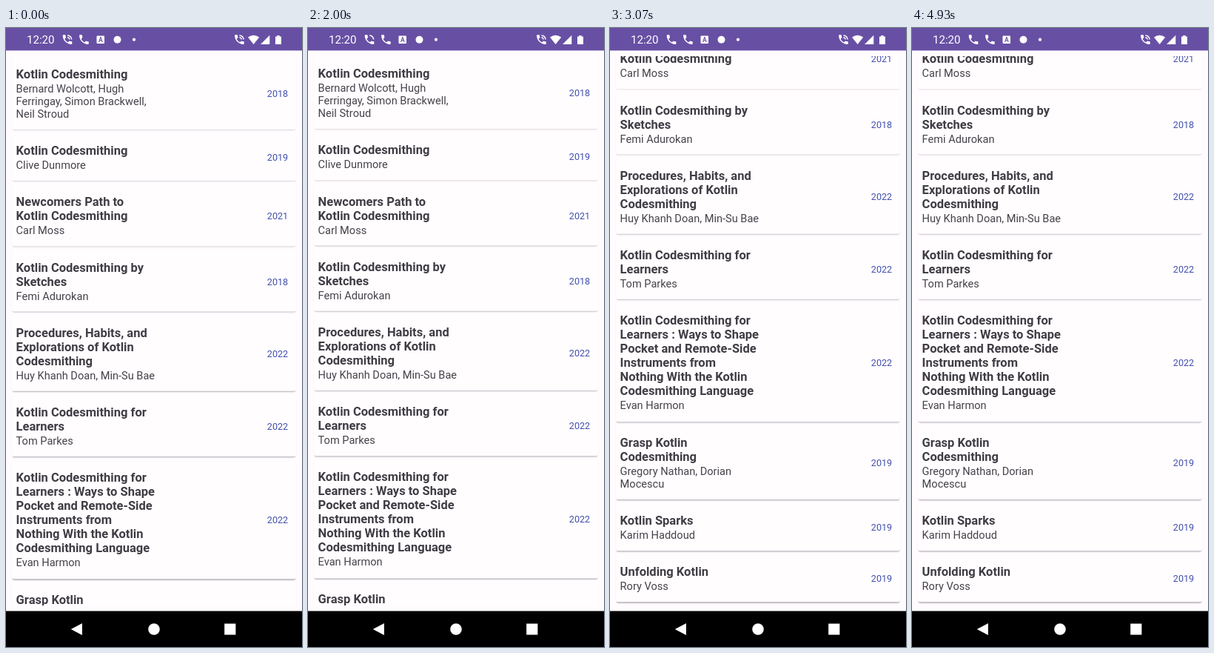
These frames come from a looping animation (400 by 835 pixels, 5000 ms). An HTML page:

```html
<!DOCTYPE html>
<html lang="en">
<head>
<meta charset="utf-8">
<title>Book list</title>
<style>
html, body { margin: 0; width: 100%; height: 100%; overflow: hidden; background: #fffbfe; }
body { position: relative; font-family: Roboto, sans-serif; }
#list { position: absolute; left: 0; top: 38px; width: 400px; height: 741px; }
.card { position: absolute; left: 8px; top: 0; width: 384px; border-radius: 3px; background: #fffdfe; transform-origin: 0 0; white-space: pre; }
.title { position: absolute; left: 5.6px; top: 14.6px; font: bold 16.53px/19.1px Roboto, sans-serif; color: #3f3c44; }
.author { position: absolute; left: 5.6px; font: 14.58px/17.1px Roboto, sans-serif; color: #45424a; }
.year { position: absolute; right: 10.8px; top: calc(50% - 6.6px); font: 12.64px/15px Roboto, sans-serif; color: #4350ad; }
#bars { position: absolute; left: 0; top: 0; }
</style>
</head>
<body>
<div id="list"></div>
<svg id="bars" width="400" height="835" fill="#fff">
  <defs>
    <path id="phone" d="M6.62 10.79c1.44 2.83 3.76 5.14 6.59 6.59l2.2-2.2c.27-.27.67-.36 1.02-.24 1.12.37 2.33.57 3.57.57.55 0 1 .45 1 1V20c0 .55-.45 1-1 1C10.61 21 3 13.39 3 4c0-.55.45-1 1-1h3.5c.55 0 1 .45 1 1 0 1.25.2 2.45.57 3.57.11.35.03.74-.25 1.02z"/>
    <path id="near" d="M15 12h2c0-2.76-2.24-5-5-5v2c1.66 0 3 1.34 3 3z"/>
    <path id="far" d="M19 12h2c0-4.97-4.03-9-9-9v2c3.87 0 7 3.13 7 7z"/>
  </defs>
  <rect width="400" height="30.4" fill="#6750a4"/>
  <text x="28" y="21.2" font-size="15.1">12:20</text>
  <g transform="translate(74.6 7.2) scale(.7)">
    <use href="#phone"/><use href="#near" id="nearWave"/><use href="#far" id="farWave"/>
  </g>
  <use href="#phone" transform="translate(97 7.2) scale(.7)"/>
  <rect x="122.5" y="10.5" width="10.5" height="10.5" rx="1"/>
  <text x="127.75" y="18.8" font-size="8.5" font-weight="bold" text-anchor="middle" fill="#6750a4">A</text>
  <circle cx="150.5" cy="15.7" r="5"/>
  <circle cx="173" cy="15.7" r="2.1"/>
  <g transform="translate(307 7.2) scale(.7)">
    <use href="#phone"/><use href="#near"/><use href="#far"/>
  </g>
  <path d="M334.6 22 327 12.6Q334.6 7 342.2 12.6zM344 22 356.3 9.7V22z"/>
  <path d="M364 11.5h2.3V10h3.4v1.5h2.3V22h-8z"/>
  <rect y="786.5" width="400" height="48.5" fill="#000"/>
  <path d="M87.8 811 102.9 802.9V819.1z"/>
  <circle cx="200" cy="811" r="7.8"/>
  <rect x="295.2" y="803.5" width="15.2" height="15"/>
</svg>
<script>
const books = [
  ["Kotlin Codesmithing", "Bernard Wolcott, Hugh\nFerringay, Simon Brackwell,\nNeil Stroud", 2018],
  ["Kotlin Codesmithing", "Clive Dunmore", 2019],
  ["Newcomers Path to\nKotlin Codesmithing", "Carl Moss", 2021],
  ["Kotlin Codesmithing by\nSketches", "Femi Adurokan", 2018],
  ["Procedures, Habits, and\nExplorations of Kotlin\nCodesmithing", "Huy Khanh Doan, Min-Su Bae", 2022],
  ["Kotlin Codesmithing for\nLearners", "Tom Parkes", 2022],
  ["Kotlin Codesmithing for\nLearners : Ways to Shape\nPocket and Remote-Side\nInstruments from\nNothing With the Kotlin\nCodesmithing Language", "Evan Harmon", 2022],
  ["Grasp Kotlin\nCodesmithing", "Gregory Nathan, Dorian\nMocescu", 2019],
  ["Kotlin Sparks", "Karim Haddoud", 2019],
  ["Unfolding Kotlin", "Rory Voss", 2019]
];
const LOOP = 5000, VIEW = 741, MAX_SCROLL = 212, GAP = 3.9;
// [start time, near wave shown, far wave shown] on the call icon
const ringing = [[0, 1, 1], [870, 0, 0], [1930, 0, 1], [2130, 0, 0], [3200, 0, 1], [3400, 1, 1], [4870, 0, 0]];

const byId = id => document.getElementById(id);
const list = byId("list");
const clamp = v => Math.min(1, Math.max(0, v));
const span = (t, from, to) => clamp((t - from) / (to - from));

function add(parent, cls, text = "") {
  const el = document.createElement("div");
  el.className = cls;
  el.textContent = text;
  return parent.appendChild(el);
}

let nextTop = 0;
const cards = books.map(([title, author, year]) => {
  const extra = 19.1 * (title.split("\n").length - 1);
  const height = 65.2 + extra + 17.1 * (author.split("\n").length - 1);
  const el = add(list, "card"), top = nextTop;
  el.style.height = height + "px";
  add(el, "title", title);
  add(el, "author", author).style.top = 35.7 + extra + "px";
  add(el, "year", year);
  nextTop += height + GAP;
  return { el, top, height };
});

function render(t) {
  const scroll = MAX_SCROLL * (1 - (1 - span(t, 2000, 2775)) ** 3);
  const pull = 13.3 * Math.sin(Math.PI * span(t, 3190, 3750)) ** 2;
  // Overscroll stretches the view upwards from its bottom edge.
  const stretch = y => y - pull * (1 - (y / VIEW) ** 2);

  list.style.clipPath = `inset(${-pull}px 0 0 0)`;
  for (const { el, top, height } of cards) {
    const y = top - scroll, a = stretch(y), b = stretch(y + height);
    const depth = clamp((y + height) / VIEW);
    el.style.transform = `translateY(${a}px) scaleY(${(b - a) / height})`;
    el.style.boxShadow = `0 ${1.4 + 0.8 * depth}px 1.5px -0.8px rgba(50,45,60,${0.2 + 0.2 * depth})`;
  }

  const [, near, far] = ringing.filter(([start]) => start <= t).pop();
  byId("nearWave").style.opacity = near;
  byId("farWave").style.opacity = far;
}

const start = performance.now();
function tick() {
  render((performance.now() - start) % LOOP);
  requestAnimationFrame(tick);
}
tick();
</script>
</body>
</html>
```
